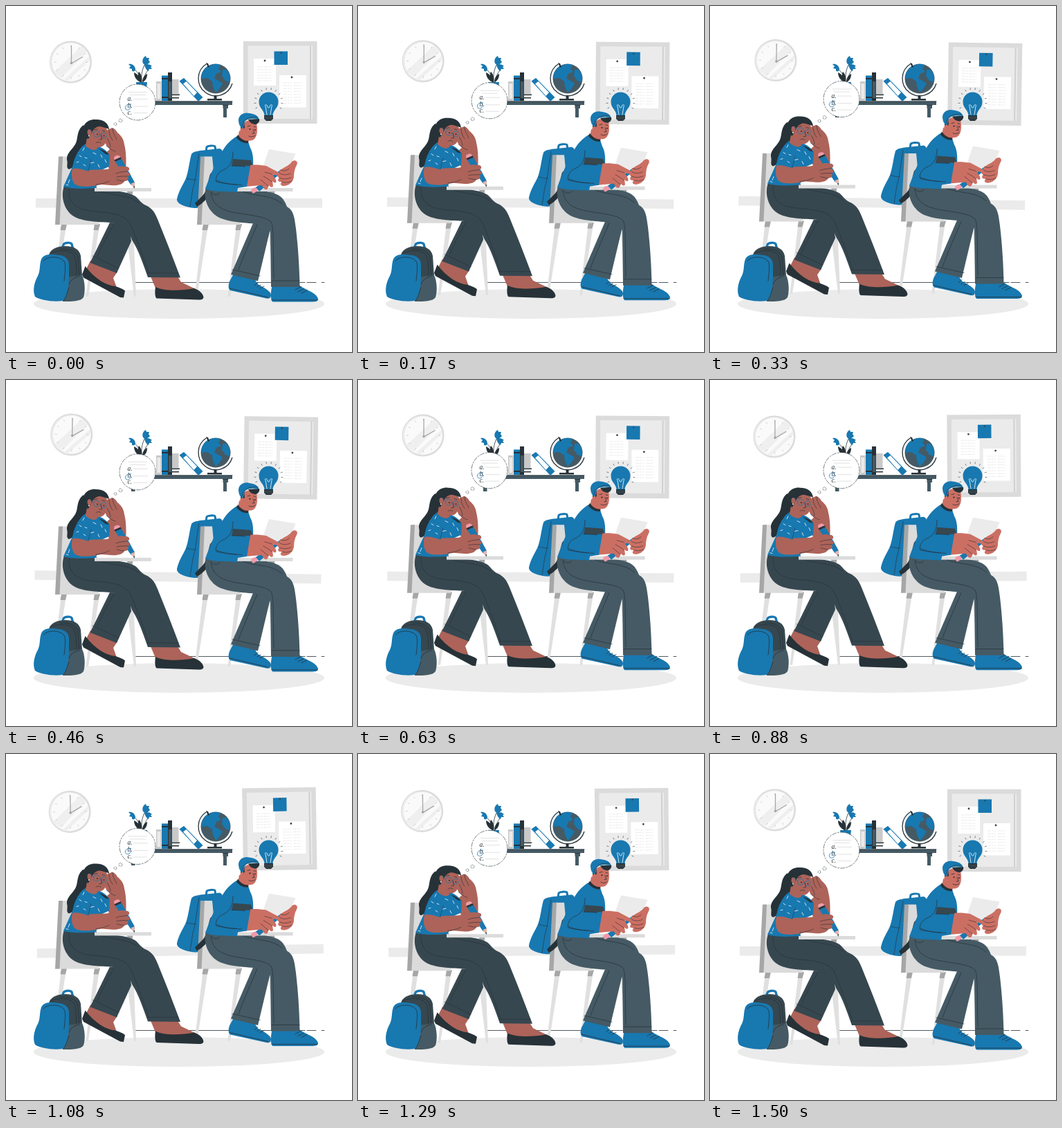
Write an HTML page that moves like this. It is 500 by 500 pixels and loops after 1540 ms.

```html
<!DOCTYPE html>
<html lang="en">
<head>
<meta charset="utf-8">
<title>Classroom</title>
<style>
html,body{margin:0;width:100%;height:100%;overflow:hidden;background:#fff}
svg{display:block;width:100vw;height:100vh;stroke-width:.8}
.b{fill:#1878b0}.d{fill:#263238}.m{fill:#455a64}.p{fill:#37474f}.w{fill:#fff}
.s{fill:#ad6359}.k{fill:#cc6f63}.g1{fill:#ebebeb}.g2{fill:#dbdbdb}.g3{fill:#a6a6a6}
.pink{fill:#ef9aa8}
.l{fill:none;stroke:#263238;stroke-linecap:round;stroke-linejoin:round}
.lw{fill:none;stroke:#fff;stroke-linecap:round}
.lb{fill:none;stroke:#1878b0}
.lg{fill:none;stroke:#dbdbdb}
text{font:italic 9.5px "Liberation Serif",serif;fill:#263238}
</style>
</head>
<body>
<svg viewBox="0 0 500 500">
<defs>
  <g id="seat">
    <path fill="#e0e0e0" d="M79 324H86L71 420H67.500ZM127 324H134L119 420H115.500Z"/>
    <path class="g3" d="M80 315H88L86 324H78.500ZM128 315H136L133.500 324H126.500Z"/>
    <path class="g2" d="M80 217.500H93L99 280H134V316H77Z"/>
    <path class="g3" d="M76 217.500H82L77.500 316H71Z"/>
  </g>
  <g id="desk">
    <path d="M175.500 268H182L188 420H185L175 335Z" fill="#e0e0e0"/>
    <path class="g3" d="M175 268H183.500L182.500 273H176Z"/>
  </g>
</defs>

<g id="wall">
  <rect class="g1" x="43" y="278" width="414" height="13.500"/>
  <circle class="g2" cx="93.500" cy="81" r="30.500"/>
  <circle cx="92.500" cy="81" r="28.500" class="g1"/>
  <circle cx="94" cy="81" r="27.500" fill="#fafafa"/>
  <path class="g1" d="M70 95L109 58L117 66L80 104ZM84 106L120 73L121.500 78L89 108Z" opacity=".75"/>
  <g id="ticks"></g>
  <path d="M94.500 57V83L111 73.500" fill="none" stroke="#a6a6a6" stroke-width="1.300"/>
  <circle class="g3" cx="94.500" cy="82.500" r="1.800"/>
  <rect class="g2" x="343" y="51" width="106.500" height="119"/>
  <rect x="349.500" y="57.500" width="93.500" height="105.500" class="g1"/>
  <path d="M439 57.500H441V163H439Z" fill="#d0d0d0"/>
  <rect class="w" x="358" y="76" width="32" height="39"/>
  <rect class="w" x="395" y="100" width="39" height="46.500"/>
  <rect class="b" x="387.500" y="65.500" width="19.500" height="19.500"/>
  <g id="notes"></g>
  <circle class="p" cx="374" cy="79" r="1.400"/>
  <circle class="p" cx="413" cy="103" r="1.400"/>
  <circle class="p" cx="397.500" cy="67.500" r="1.200"/>
</g>

<ellipse class="g1" cx="250" cy="430.500" rx="210" ry="21.500"/>
<path class="l" d="M187 399.500H432M435 399.500H448M456 399.500H460"/>

<g id="shelf">
  <path class="m" d="M181 143H186.500V161H181ZM313.500 143H321V148H319V161H314V148H313.500Z"/>
  <rect class="m" x="181" y="137.500" width="146" height="5.500"/>
  <path class="l" d="M181 138H327M313.500 143.500H321"/>
  <path class="b" d="M188 110H204L201 137H191Z"/>
  <path class="l" d="M195 110C194 101 190 95 185 91M196 110C195 99 197 91 201 83M198 110C199 103 201 98 205 93"/>
  <path class="d" d="M194 110C188 107 185 102 185 96C191 99 195 104 195 110ZM197 110C197 104 200 100 204 98C204 104 202 108 197 110ZM194 110C191 104 190 99 192 95C196 99 197 104 196 110Z"/>
  <path class="b" d="M187 91C186 85 181 83 177 84L180 87L178 90L182 91L182 94C185 95 187 94 187 91ZM198 83C196 77 199 74 202 72L203 75L207 75L206 78L208 81C205 85 201 86 198 83ZM200 85C203 83 208 84 211 87L209 88L211 91L207 91L206 94C203 93 201 89 200 85Z"/>
  <path fill="#c9c9c9" d="M217 109H224.500V137H217ZM240 106H249.500V127H240Z"/>
  <path class="g1" d="M218.500 112H223V134H218.500Z"/>
  <path class="b" d="M225 100.500H234V137H225Z"/>
  <path class="d" d="M225 104H234V106H225ZM225 131H234V133H225ZM234 96H240V137H234Z"/>
  <path class="m" d="M235 109H239.500V133H235Z"/>
  <path class="d" d="M240 127.500H251V129H240ZM240 132H250V133.500H240Z"/>
  <path class="g1" d="M240 129H250V132H240Z"/>
  <path class="b" d="M250.500 108.500L257 104L284.500 132L279 137H277Z"/>
  <path class="w" d="M256 112.500L260.500 109L276 125L271.500 130Z"/>
  <circle class="m" cx="303" cy="105" r="21.500"/>
  <path class="b" d="M288 90C294 84 303 83 310 85L307 91L311 95L304 98L301 105L307 108L313 112L308 120L303 125L299 116L298 109L291 104L283 105C282 99 284 94 288 90ZM313 92L319 92C323 97 325 103 323 110L317 108L312 101Z"/>
  <path d="M289.500 83.800A25 25 0 1 0 327 112" fill="none" stroke="#263238" stroke-width="1.300"/>
  <path class="d" d="M300.500 129H304.500V134H312V136.500H291V134H300.500ZM289 82L292 83L294 88L292 89Z"/>
</g>

<g id="bulb">
  <path class="b" d="M373.500 158C373 150 365.500 148 365.500 138.500A14 14 0 0 1 393.500 138.500C393.500 148 386 150 385.500 158Z"/>
  <path class="lw" d="M377 157L375 145C373 142 377 142 378 145C378 148 381 148 381 145C382 142 386 142 384 145L382 157"/>
  <path class="d" d="M373 158H386V163L383 166H376L373 163Z"/>
  <path d="M373 160.500H386M374 163H385" stroke="#6b7c84" stroke-width=".5"/>
  <g id="rays"></g>
</g>

<g class="float">
  <!-- bag on the chair -->
  <path class="lb" d="M289 210L290 204C290 202 301 201 302 203L303 209" stroke-width="3"/>
  <path class="b" d="M268 214C270 210 280 209 290 208L309 206C314 208 314 213 312 220L301 240L290 283C285 290 279 292 273 292C260 291 246 286 247 279C249 268 256 258 260 249C264 238 265 224 268 214Z"/>
  <path class="l" d="M279 213C275 235 275 248 270 264L266 290M261 249C265 250 270 252 274 251" stroke-width=".6"/>
  <use href="#seat" x="205"/>
  <path class="d" d="M303 234L295 243C291 256 291 266 285 273L273 285L276 290C285 285 291 278 295 270L302 256Z"/>
  <use href="#desk" x="205"/>
  <!-- legs -->
  <path class="b" d="M329 387L323 398C321 404 321 408 324 411L374 422C380 424 383 422 383 418C383 412 374 408 364 402L358 393Z"/>
  <path class="b" d="M385 403H423L429 407C440 413 448 415 451 423C451 427 447 427.500 442 427.500H386C382 427 382 412 385 403Z"/>
  <path class="l" d="M323 408L378 421M384 425H450M359 404L364 400M363 406L368 403M367 408L373 405M418 410L426 406M422 413L430 409M427 415L435 411"/>
  <path class="m" d="M357 314L325 388L364 397.500L381.500 324V314Z"/>
  <path class="m" d="M289 262H334L340 267C362 265 381 267 393 273C401 277 404 285 406 290C416 295 417 307 419 322C422 348 424 375 424.500 406H383L382 328C381 320 375 317 364 315C341 313 318 312 305 304C290 294 285 276 289 262Z"/>
  <path class="l" d="M296 268C298 289 312 295 333 299C357 303 374 304 383 312C387 318 386 345 387 394M384 397H424M327 381L367 390M342 268C362 276 383 272 399 286M363 316C354 337 343 362 336 381M297 270C302 274 306 273 309 270" stroke-width=".7"/>
  <rect class="g2" x="333" y="263" width="81.500" height="5"/>
  <!-- torso -->
  <path class="k" d="M337 180L352 190L350 198L335 192Z"/>
  <path class="b" d="M334 188C325 193 316 202 311 213C302 227 296 243 288 264C302 270 318 267 334 269L335 263L348 261L354 234L357 232C358 219 356 210 353 205L350 196C344 197 338 193 334 188Z"/>
  <path class="d" d="M335 186C339 192 344 195 350 195L350 198C343 199 337 195 333 190Z"/>
  <path class="p" d="M328 221L354 223L357 232L326 231Z"/>
  <path class="l" d="M328 211C328 224 324 233 314 237C304 241 302 251 304 254C316 257 331 258 345 259M304 252C313 256 324 258 333 258M354 233C345 232 337 231 326 231" stroke-width=".7"/>
  <!-- head -->
  <path class="k" d="M341 172C346 164 357 164 362 169C364 180 363 189 358 193C351 197 344 193 341 186Z"/>
  <path class="d" d="M339 170L344 168L345 175L343 181L339 178ZM350 164L366 163C367 166 365 170 361 171C356 171 353 169 350 164Z"/>
  <path class="b" d="M336 164C337 157 344 153 352 155C359 156 364 158 365.500 163.500C356 162 348 163 345 167L343 177C338 176 336 170 336 164Z"/>
  <path class="l" d="M341 174C342 164 352 159 364 161" stroke-width=".5"/>
  <ellipse class="k" cx="341.500" cy="180.500" rx="3.200" ry="4.200"/>
  <path class="l" d="M349 174L353 173M358 174L361 175M357 178L359 184L356 184M351 188C354 190 358 189 360 187"/>
  <circle class="d" cx="352.500" cy="178" r="1.100"/><circle class="d" cx="360" cy="179" r="1"/>
  <!-- sheet and hands -->
  <path class="g1" d="M380 207L418.500 213.500L408 239L393 247L371 233Z"/>
  <path class="pink" d="M354 267C354 264 358 262 362 262L364 267L357 271Z"/>
  <path class="b" d="M361 262L398 236L400 239L366 268Z"/>
  <path class="k" d="M353 230C360 229 369 230 376 231L395 241C399 244 396 247 392 245L385 243L390 251C392 256 388 257 385 253L386 260C385 263 382 262 380 259L378 264C375 267 372 264 370 259C361 260 354 260 347 261Z"/>
  <path class="l" d="M374 240C380 242 383 242 386 244M372 246C377 249 381 251 384 254M368 251C373 255 376 258 379 260" stroke-width=".6"/>
  <path class="k" d="M398 236C404 232 410 230 413 225C418 221 423 225 420 230C417 235 416 241 416 247C415 255 407 261 400 260C396 259 396 256 399 254C394 255 391 252 395 248C391 247 392 243 396 242C394 239 395 237 398 236Z"/>
  <path class="l" d="M397 237C402 239 406 238 409 235M396 242C401 245 406 244 411 242M395 248C401 251 407 250 412 248M399 254C404 256 409 255 413 253" stroke-width=".6"/>
  <path class="b" d="M346 231L353 231L348 261L341 260Z"/>
</g>

<g class="float">
  <use href="#seat"/>
  <use href="#desk"/>
  <!-- legs -->
  <path class="s" d="M122 368L161 384L155 393L160 407L140 403L116 380Z"/>
  <path class="d" d="M114.500 376L110 388L112 392.500L165 421L170 421.500L172 411.500C168 408 163 407 158 405C145 404 128 394 114.500 376Z"/>
  <path class="s" d="M209 391H248L253 399L274 409L250 415L217 410Z"/>
  <path class="d" d="M216 406C228 412 252 412 272 408C280 411 285 416 285.500 421C285 424 282 424.500 278 424.500L218 422.500C215 422 215 412 216 406Z"/>
  <path class="p" d="M150 313L121.500 371L160 386L181 340L178 314Z"/>
  <path class="p" d="M84 260H129L134 267C155 266 176 268 187 275C192 279 195 285 202 288C211 292 215 298 219 308C230 335 241 363 252 392.500L205 392C197 370 192 354 182 338C177 322 170 315 152 313C130 312 106 311 95 302C83 292 79 274 84 260Z"/>
  <path class="l" d="M91 264C90 290 107 295 130 297C156 299 171 302 179 314C186 330 198 360 206 386M125 361L163 379M204 386L249 386M137 268C158 275 180 273 192 285M156 315C148 330 138 347 132 362" stroke-width=".6"/>
  <!-- long hair -->
  <path class="d" d="M112 172C101 180 105 192 100 200C96 207 87 213 88 222C90 228 86 234 91 236C98 234 101 228 102 222C108 220 107 212 114 206L123 194Z"/>
  <!-- raised arm -->
  <path class="s" d="M142 214L150 207C144 201 141 196 145 192L148 189C145 184 146 178 150 178C154 174 158 178 161 183C167 188 170 192 171 200C174 212 174 226 173 241L150 239Z"/>
  <!-- torso -->
  <path class="b" d="M117 198C107 203 101 214 97 230L83 261C98 265 115 264 130 263L138 237L149 232L150 216C145 207 136 203 130 202Z"/>
  <path class="d" d="M134 206C141 208 146 211 149 215L144 214Z"/>
  <path class="s" d="M117 190L131 196L132 205C130 211 120 207 115 202Z"/>
  <path class="lw" d="M104 212L107 214M112 222L110 227M126 212L130 214M137 215L139 219M122 227L127 226M100 244L104 242M92 251L90 256M118 258L122 256M143 222L145 226M133 229L135 233M113 205L111 209M87 258L90 259"/>
  <!-- head -->
  <path class="s" d="M118 182C120 172 130 169 139 172C147 175 148 183 146 190C145 199 140 205 133 204C124 203 118 195 118 182Z"/>
  <path class="d" d="M112 190C107 173 117 163 130 164C142 164 148 170 149 178C143 176 138 174 134 174C130 175 127 177 125 181L119 192Z"/>
  <ellipse class="s" cx="120.500" cy="182.500" rx="3" ry="4.200"/>
  <circle class="w" cx="120" cy="187.500" r="1"/>
  <path class="lb" d="M121 179L127 184M135.500 185.500L137.500 186"/>
  <circle class="lb" cx="131" cy="185" r="4.400"/>
  <circle class="lb" cx="141.500" cy="187" r="4"/>
  <path class="l" d="M127 179L132 178M139 180L143 181M137 186L138.500 193L135 193M130 198C132 196 135 196 137 198" stroke-width=".7"/>
  <circle class="d" cx="132" cy="185.500" r="1"/><circle class="d" cx="141.500" cy="187.500" r="1"/>
  <path class="s" d="M146 190C144 183 146 177 150 177.500L161 184L167 196L160 206C153 205 149 199 146 190Z"/>
  <path class="l" d="M149 180C149 185 151 190 154 194M154 177C154 184 158 188 160 193M146 191C149 196 151 200 151 204M145 202C152 207 155 210 158 210" stroke-width=".6"/>
  <!-- desk top and writing arm -->
  <rect class="g2" x="128" y="263" width="82" height="5"/>
  <path class="s" d="M97 233C104 230 111 234 119 237L145 236C153 235 160 231 168 231.500L176 233C180 235 178 238 174 239C181 241 181 245 176 246C179 250 176 253 171 253C169 258 161 260 151 259L138 258C124 261 106 263 99 257C94 251 94 240 97 233Z"/>
  <path class="b" d="M106 209C100 216 97 225 96 235C104 234 111 236 119 239L123 222Z"/>
  <path class="l" d="M119 238L123 222" stroke-width=".5"/>
  <path class="lw" d="M106 216L109 218M102 226L105 225M112 229L115 231M114 219L117 220"/>
  <path class="pink" d="M157 223C155 219 156 217 160 216C163 215 165 217 166 220Z"/>
  <path class="d" d="M156.500 222.500L165.500 218.500L167 221L158 225Z"/>
  <path class="b" d="M158 225L167 221L186 255L185 261L180 258Z"/>
  <path fill="#e8b4a8" d="M180 257L186 254.500L185.500 263Z"/>
  <path class="d" d="M184 261L186 260L185.500 264Z"/>
  <path class="s" d="M150 235C157 234 162 231 169 231.500L176 232.500C180 235 178 238 173 239C179 240 181 245 176 246C178 250 176 253 170 253L166 257L152 257Z"/>
  <path class="l" d="M174 239C168 240 164 240 159 242M176 246C169 246 164 246 160 247M171 253C167 253 163 252 160 251M130 258C140 257 145 255 149 253" stroke-width=".6"/>
  <!-- thought -->
  <circle cx="190" cy="139" r="26" class="w"/>
  <circle cx="190" cy="139" r="26" class="l" stroke-dasharray="6 2 2 2" stroke-width=".6"/>
  <circle cx="165.500" cy="165.500" r="2.500" class="l" stroke-dasharray="3 1.500" stroke-width=".5"/>
  <circle cx="158" cy="170.500" r="2" class="l" stroke-dasharray="3 1.500" stroke-width=".5"/>
  <path class="lg" d="M177 124.500H204M179 128.500H202M184 134.500H205M184 145H205M184 154.500H204"/>
  <text x="175.500" y="137">a.</text><text x="175.500" y="147">b.</text><text x="175.500" y="156.500">c.</text>
  <path class="lb" d="M181 142C174 141 171 146 173 149C176 152 181 149 180 145"/>
</g>

<g id="bag">
  <path class="lb" d="M81 352L83 345C84 342 93 341 95 344L97 352" stroke-width="3.400"/>
  <path class="p" d="M62 360C64 351 74 347 86 347C99 347 106 352 108 361L110 390L109 424L86 427L70 400Z"/>
  <path class="m" d="M88 392L110 389C114 397 115 412 112 421C108 427 95 427 82 427Z"/>
  <path class="l" d="M64 357C80 350 95 354 99 362C102 370 101 380 102 390M78 351C92 350 102 355 104 364L106 389"/>
  <path class="b" d="M51 366C54 358 66 358 76 360C86 361 91 366 91 374V397C90 411 88 422 82 426C68 428 49 425 42 420C38 411 41 399 46 390C50 382 48 374 51 366Z"/>
  <path class="l" d="M54 368C60 361 78 361 84 369C87 374 85 388 84 397M106 391C99 392 93 396 91 402M91 407C88 415 87 421 83 426"/>
</g>
</svg>
<script>
const FPS = 24, STEPS = 36, LOOP = 1540;
const $ = id => document.getElementById(id);

function path(parent, d, color, width, dash = "") {
  const el = document.createElementNS("http://www.w3.org/2000/svg", "path");
  el.setAttribute("d", d);
  el.setAttribute("stroke", color);
  el.setAttribute("stroke-width", width);
  if (dash) el.setAttribute("stroke-dasharray", dash);
  el.setAttribute("fill", "none");
  parent.append(el);
}

// Radial strokes around a point
function spokes(parent, cx, cy, r1, r2, from, to, count, color, width) {
  for (let i = 0; i < count; i++) {
    const a = (from + (to - from) * i / count) * Math.PI / 180;
    const c = Math.cos(a), s = Math.sin(a);
    path(parent, `M${cx + r1 * c} ${cy + r1 * s}L${cx + r2 * c} ${cy + r2 * s}`, color, width);
  }
}

function lines(x1, x2, y, gap, count) {
  for (let i = 0; i < count; i++)
    path($("notes"), `M${x1} ${y + i * gap}H${x2}`, "#e6e6e6", .8, "5 1 3 1");
}

spokes($("ticks"), 94, 81, 21.5, 24.5, 0, 360, 12, "#c7c7c7", .8);
spokes($("rays"), 379.5, 139, 18, 21, 155, 407, 12, "#263238", .6);
lines(363, 384, 88, 4, 6);
lines(401, 413, 111, 4.2, 8);
lines(416, 427, 111, 4.2, 8);

const floats = document.querySelectorAll(".float");

function draw(now) {
  const step = Math.floor((now % LOOP + 4) * FPS / 1000);
  const p = Math.min(step / STEPS, 1);
  const tilt = p < .25 ? 4 * p : p < .75 ? 2 - 4 * p : 4 * p - 4;
  const lift = -10 * (1 - Math.abs(1 - 2 * p));
  $("wall").setAttribute("transform", `rotate(${tilt} 250 171)`);
  floats.forEach(g => g.setAttribute("transform", `translate(0 ${lift})`));
}

function tick() {
  draw(performance.now());
  requestAnimationFrame(tick);
}
tick();
</script>
</body>
</html>
```
